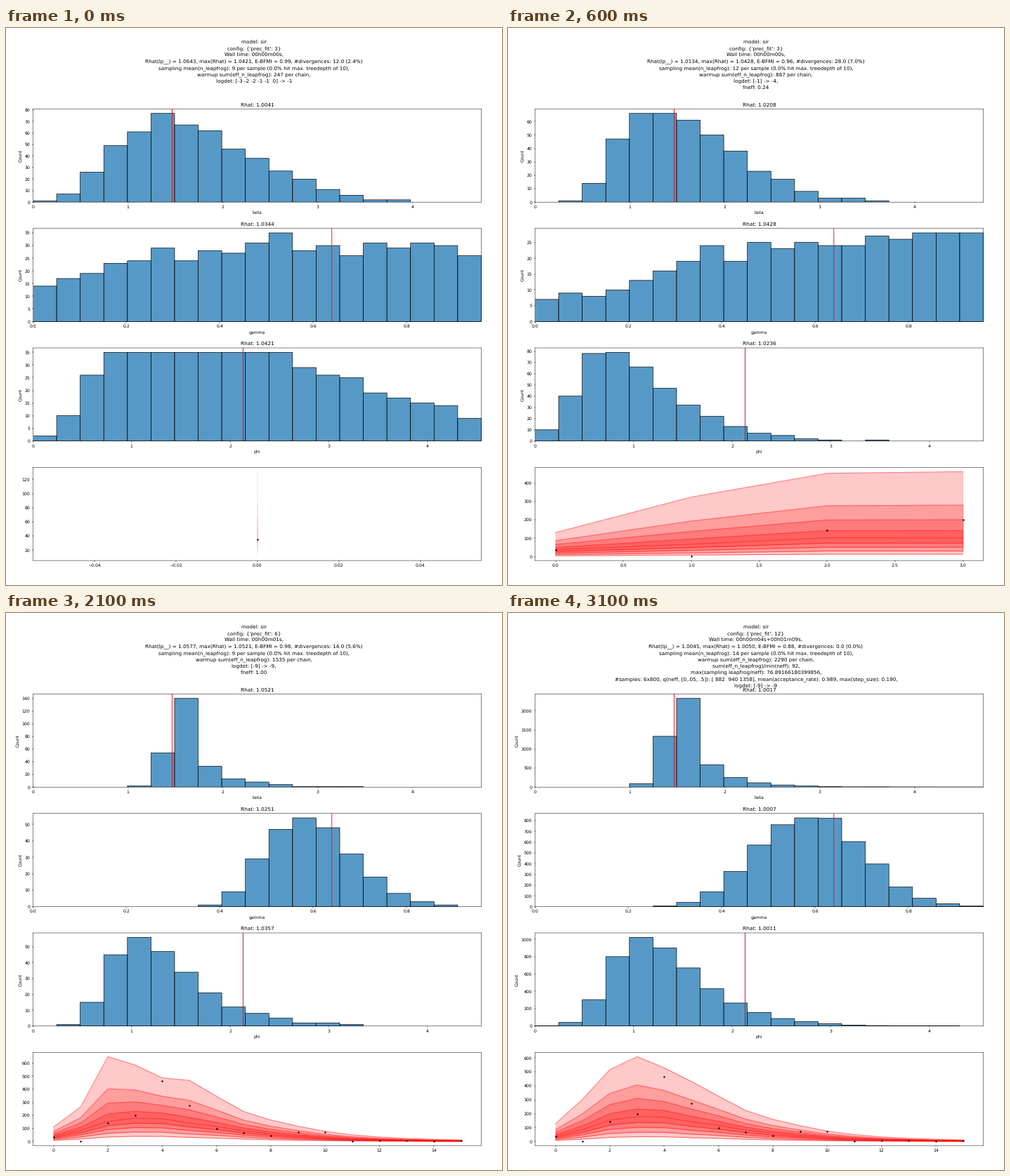
Recreate the animation shown at these times as a matplotlib script. Size 706 px wide and 794 px high, loop 3.6 s.

```python
import numpy as np
import matplotlib.pyplot as plt
from matplotlib.animation import FuncAnimation

W, H, DPI = 706, 794, 64
SCALE = W / 16 / DPI  # a 16 inch wide layout shrunk to the stage
BINS = 19

for key in ("font.size", "axes.linewidth", "axes.labelpad", "axes.titlepad",
            "xtick.major.size", "xtick.major.width", "xtick.major.pad",
            "ytick.major.size", "ytick.major.width", "ytick.major.pad",
            "lines.linewidth", "patch.linewidth"):
    plt.rcParams[key] *= SCALE
plt.rcParams["font.family"] = "DejaVu Sans"
plt.rcParams["text.hinting"] = "none"
plt.rcParams["path.snap"] = False

# name, axis end, true value, line colour
PARAMS = [("beta", 4.722, 1.4655, "#ff0000"),
          ("gamma", 0.9594, 0.6395, "#e8101c"),
          ("phi", 4.549, 2.132, "#b81028")]
OBSERVED = np.array([35, 2, 143, 200, 467, 276, 96, 65,
                     43, 70, 70, 3, 6, 6, 2, 8])
rng = np.random.default_rng(4)


def hist(total, peak, mode, left, right, tail):
    """Two-sided bell of `total` samples with a little sampling noise."""
    d = np.arange(BINS) - mode
    shape = np.where(d < 0, np.exp(-np.abs(d / left) ** 2.5),
                     np.exp(-np.abs(d / right) ** tail))
    counts = total * shape / shape.sum()
    counts += 0.4 * np.sqrt(counts) * rng.standard_normal(BINS)
    counts[round(mode)] = peak
    return np.clip(np.round(counts), 0, peak)


def fits(total, *shapes):
    return [hist(total, *shape) for shape in shapes]


def blend(a, b, weight=1):
    return [np.round((p + q * weight) / 2) for p, q in zip(a, b)]


# per parameter: peak, mode bin, left scale, right scale, tail exponent
first = fits(500, (77, 5, 2.85, 5, 2), (35, 10, 12.2, 40, 2),
             (35, 4, 2.6, 12, 2))
second = fits(400, (66, 4.4, 1.98, 4.6, 2), (28, 18, 16, 9, 2),
              (79, 2.9, 2.15, 3.2, 1.4))
rough = fits(250, (140, 6, 1.09, 0.65, 0.75), (54, 11, 2.3, 2.93, 2),
             (56, 4.1, 1.9, 3, 1.4))
final = fits(4800, (2324, 6, 1.25, 0.66, 0.73), (825, 11.3, 3.35, 3.05, 2),
             (1024, 4.2, 2, 3, 1.4))
HISTS = [first, blend(first, second), second,
         fits(364, (106, 6, 2.2, 1.35, 1), (45, 10, 5.9, 5, 2),
              (77, 3.8, 2.1, 3.1, 1.4)),
         fits(360, (169, 6, 1.3, 0.67, 0.75), (59, 10.4, 2.7, 4, 2),
              (85, 3, 1.2, 3.5, 1.4)),
         rough, blend(rough, final, 250 / 4800), final]

# median epidemic, from a few points on a log scale
DAYS = np.arange(16)
MEDIAN = np.exp(np.interp(DAYS, [0, 1, 2, 3, 4, 6, 9, 12, 15],
                          np.log([38, 85, 153, 178, 174, 115, 42, 12, 4])))

# upper edge of the first days; later days follow the median
early = [131, 324, 453, 462]
coarse = np.array([110, 265, 651, 587, 488, 469, 347, 230])
smooth = np.array([128, 304, 517, 610, 530, 432, 326, 223])
TOPS = [early[:1], early[:2], early,
        [145, 324, 449, 629, 511, 518, 475, 405],
        [143, 325, 506, 573, 537, 407, 363, 209],
        coarse, (coarse + smooth) / 2, smooth]
LOW_SPREAD = [1.22, 1.5, 2, 1.75, 1.7, 1.5, 1.6, 1.65]


def quantiles(step):
    n = min(2 ** step, 16)
    damp = 0.25 if step < 3 else 0
    mid = MEDIAN[:n] / (1 + damp * DAYS[:n])
    top = np.array(TOPS[step], float)
    top = np.append(top, top[-1] * MEDIAN[len(top):n] / MEDIAN[len(top) - 1])
    lower = [mid * np.exp(-LOW_SPREAD[step] * f) for f in (1, 0.6, 0.34, 0.16)]
    upper = [mid * (top / mid) ** f for f in (0, 0.22, 0.45, 0.67, 1)]
    return lower + upper


def header(prec, wall, lp, worst, bfmi, div, leap, warm, *rest):
    return ["model: sir",
            f"config: {{'prec_fit': {prec}}}",
            f"Wall time: {wall},",
            f"Rhat(lp__) = {lp}, max(Rhat) = {worst}, "
            f"E-BFMI = {bfmi}, #divergences: {div}",
            f"sampling mean(n_leapfrog): {leap} per sample "
            "(0.0% hit max. treedepth of 10),",
            f"warmup sum(eff_n_leapfrog): {warm} per chain,",
            *rest]


HEADERS = [
    header(3, "00h00m00s", "1.0643", "1.0421", "0.99", "12.0 (2.4%)", 9, 247,
           "logdet: [-3 -2 -2 -1 -1  0] -> -1"),
    header(3, "00h00m00s", "1.0387", "1.0425", "0.97", "20.0 (4.5%)", 10, 562,
           "logdet: [-1] -> -1,", "fneff: 0.20"),
    header(3, "00h00m00s", "1.0134", "1.0428", "0.96", "28.0 (7.0%)", 12, 887,
           "logdet: [-1] -> -4,", "fneff: 0.24"),
    header(3, "00h00m01s", "1.1177", "1.0718", "0.80", "8.0 (2.2%)", 9, 978,
           "logdet: [-4] -> -6,", "fneff: 0.33"),
    header(3, "00h00m01s", "1.0903", "1.1911", "0.91", "4.0 (1.1%)", 12, 834,
           "logdet: [-6] -> -9,", "fneff: 0.38"),
    header(6, "00h00m01s", "1.0577", "1.0521", "0.98", "14.0 (5.6%)", 9, 1535,
           "logdet: [-9] -> -9,", "fneff: 1.00"),
    header(12, "00h00m01s", "1.0312", "1.0286", "0.93", "6.0 (2.4%)", 11, 1912,
           "logdet: [-9] -> -9,", "fneff: 1.00"),
    header(12, "00h00m04s+00h01m09s", "1.0045", "1.0050", "0.88",
           "0.0 (0.0%)", 14, 2290,
           "sum(eff_n_leapfrog)/min(neff): 92,",
           "max(sampling leapfrog/neff): 76.89166180399856,",
           "#samples: 6x800, q(neff, [0,.05, .5]): [ 882  940 1358], "
           "mean(acceptance_rate): 0.989, max(step_size): 0.190,",
           "logdet: [-9] -> -9"),
]
RHATS = [("1.0041", "1.0344", "1.0421"), ("1.0125", "1.0425", "1.0329"),
         ("1.0208", "1.0428", "1.0236"), ("1.0651", "1.0459", "1.0718"),
         ("1.1911", "1.1002", "1.1029"), ("1.0521", "1.0251", "1.0357"),
         ("1.0286", "1.0137", "1.0194"), ("1.0017", "1.0007", "1.0011")]

fig = plt.figure(figsize=(W / DPI, H / DPI), dpi=DPI, facecolor="white")
axes = [fig.add_axes([38.5 / W, 1 - (248.2 + 170.3 * i) / H,
                      638 / W, 132.8 / H]) for i in range(4)]
labels = [fig.text(0.5, 1 - (22 + 9.27 * i) / H, "", fontsize=11.92 * SCALE,
                   ha="center", va="baseline") for i in range(10)]


def draw_hist(ax, counts, rhat, name, end, truth, color):
    ax.clear()
    width = end / BINS
    used = np.flatnonzero(counts)
    ax.bar(used * width, counts[used], width, align="edge",
           facecolor=(31 / 255, 119 / 255, 180 / 255, 0.75),
           edgecolor="black", linewidth=1.1 * SCALE)
    ax.axvline(truth, color=color)
    ax.set_xlim(0, end)
    ax.set_ylim(0, counts.max() * 1.05)
    ax.set_xlabel(name)
    ax.set_ylabel("Count")
    ax.set_title(f"Rhat: {rhat}")


def draw_bands(ax, rows):
    ax.clear()
    t = DAYS[:len(rows[0])]
    for i in range(4):
        ax.fill_between(t, rows[i], rows[8 - i], color="red", alpha=0.21)
    for row in rows:
        ax.plot(t, row, color="red", alpha=0.5)
    ax.scatter(t, OBSERVED[:len(t)], s=(4 * SCALE) ** 2, color="black",
               linewidths=0, zorder=3)


def update(frame):
    step = (frame + 4) // 5
    lines = HEADERS[step]
    for i, label in enumerate(labels):
        label.set_text(lines[i] if i < len(lines) else "")
    for ax, counts, rhat, param in zip(axes, HISTS[step], RHATS[step], PARAMS):
        draw_hist(ax, counts, rhat, *param)
    draw_bands(axes[3], quantiles(step))
    return []


anim = FuncAnimation(fig, update, frames=36, interval=100,
                     init_func=lambda: update(0), repeat=True, repeat_delay=0)
plt.show()
```
